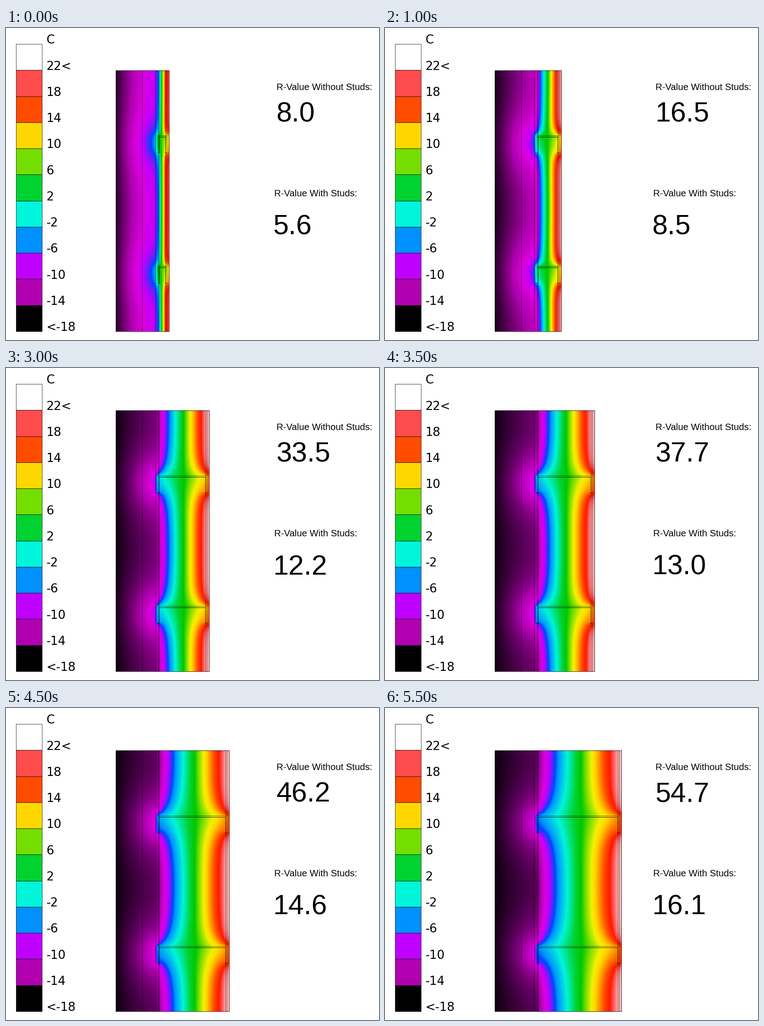
A matplotlib script that plays this animation: 819 by 684 pixels, repeating every 6 s.

```python
import numpy as np
import matplotlib.pyplot as plt
from matplotlib.animation import FuncAnimation
from matplotlib.collections import LineCollection
from matplotlib.patches import Rectangle

WIDTH, HEIGHT, DPI = 819, 684, 72
STEPS, INTERVAL = 12, 500
LEFT, TOP, BOTTOM, PERIOD = 241, 93, 665, 286
SHEATHING, FLANGE, CAVITY = 327, 333, 335
STUD_TOP, STUD_END = 143, 179  # measured from the top of one stud bay
T_OUT, T_IN = -18, 21
FILM_OUT, FILM_IN = 0.17, 0.68
K_CLADDING, K_SHEATHING, K_STRIP = 70, 11, 10
K_FOAM, K_DRYWALL, K_STEEL = 3.42, 21, 2200

STUDDED_R = [5.6, 7.2, 8.5, 9.5, 10.5, 11.4, 12.2, 13.0, 13.8, 14.6, 15.3, 16.1]

# temperature -> colour, from coldest to hottest
SCALE = [
    (-18, (0, 0, 0)), (-14, (176, 0, 176)), (-12, (218, 0, 222)),
    (-10, (192, 0, 255)), (-7.3, (0, 70, 255)), (-6, (0, 144, 255)),
    (-2, (0, 245, 219)), (2, (0, 210, 48)), (4, (0, 200, 0)),
    (6, (116, 222, 0)), (8.5, (242, 242, 0)), (10, (255, 215, 0)),
    (14, (255, 76, 0)), (16.5, (255, 25, 0)), (18, (255, 76, 76)),
    (22, (255, 255, 255)),
]
SCALE_T = [t for t, _ in SCALE]
SCALE_RGB = np.array([c for _, c in SCALE]) / 255

# rows of one bay, finer around the stud
ROWS = np.concatenate([np.arange(0, 119, 7), np.arange(119, 199, 2),
                       np.linspace(199, PERIOD, 13)])
DY = np.diff(ROWS)
Y_MID = (ROWS[:-1] + ROWS[1:]) / 2


def colour(temp):
    return np.stack([np.interp(temp, SCALE_T, SCALE_RGB[:, c]) for c in range(3)], -1)


def right_edge(step):
    return int(round(358.3 + 14.58 * step))


def conductivity(right):
    """Conductivity of each cell, indexed [column, row]."""
    x = np.arange(LEFT, right) + 0.5
    inner, board = right - 8, right - 6
    layers = np.select(
        [x < SHEATHING, x < FLANGE, x < CAVITY, x < inner, x < board],
        [K_CLADDING, K_SHEATHING, K_STRIP, K_FOAM, K_STRIP], K_DRYWALL)
    k = np.repeat(layers[:, None].astype(float), len(DY), axis=1)
    stud = (x > FLANGE) & (x < board)
    flanges = stud & ((x < CAVITY) | (x > inner))
    web = (Y_MID > STUD_TOP) & (Y_MID < STUD_TOP + 2)
    legs = (Y_MID > STUD_TOP) & (Y_MID < STUD_END)
    k[np.ix_(stud, web)] = K_STEEL
    k[np.ix_(flanges, legs)] = K_STEEL
    return k


def solve(right):
    """Steady heat flow through one periodic bay, by block elimination."""
    k = conductivity(right)
    columns, rows = k.shape
    half_x, half_y = 0.5 / k, DY / (2 * k)
    across = DY / (half_x[:-1] + half_x[1:])
    down = 1 / (half_y + np.roll(half_y, -1, axis=1))
    g_out = DY / (FILM_OUT + half_x[0])
    g_in = DY / (FILM_IN + half_x[-1])
    j = np.arange(rows)
    below = (j + 1) % rows
    gains, offsets = [], []
    for i in range(columns):
        before = across[i - 1] if i else g_out
        after = across[i] if i < columns - 1 else g_in
        a = np.diag(before + after + down[i] + np.roll(down[i], 1))
        a[j, below] -= down[i]
        a[below, j] -= down[i]
        if i:
            a -= before[:, None] * gains[-1]
            source = before * offsets[-1]
        else:
            source = before * T_OUT
        both = np.linalg.solve(a, np.column_stack([np.diag(after), source]))
        gains.append(both[:, :-1])
        offsets.append(both[:, -1])
    temp = np.empty((columns, rows))
    following = np.full(rows, float(T_IN))
    for i in reversed(range(columns)):
        following = gains[i] @ following + offsets[i]
        temp[i] = following
    return temp


def wall_image(step):
    temp = solve(right_edge(step))
    y = (np.arange(BOTTOM - TOP) + 0.5) % PERIOD
    pixels = [np.interp(y, Y_MID, column, period=PERIOD) for column in temp]
    return colour(np.array(pixels).T)


def vertical(x, y0, y1):
    return [(x + 0.5, y0), (x + 0.5, y1)]


def horizontal(y, x0, x1):
    return [(x0, y + 0.5), (x1, y + 0.5)]


def layer_lines(right):
    xs = (298, SHEATHING, FLANGE, CAVITY, right - 9, right - 6)
    lines = [vertical(x, TOP, BOTTOM) for x in xs]
    for bay in (TOP, TOP + PERIOD):
        lines.append(horizontal(bay + STUD_TOP - 1, FLANGE, right - 5))
    return lines


def solid_lines(right):
    lines = [vertical(x, TOP, BOTTOM) for x in (LEFT, right - 1)]
    lines += [horizontal(y, LEFT, right) for y in (TOP - 1, BOTTOM - 1)]
    for bay in (TOP, TOP + PERIOD):
        web, end = bay + STUD_TOP + 2, bay + STUD_END
        lines.append(horizontal(web, CAVITY, right - 8))
        for x in (CAVITY, right - 9):
            lines.append(vertical(x, web, end))
        for x in (FLANGE, right - 9):
            lines.append(horizontal(end, x, x + 3))
    return lines


fig = plt.figure(figsize=(WIDTH / DPI, HEIGHT / DPI), dpi=DPI, facecolor="white")
ax = fig.add_axes([0, 0, 1, 1])
ax.axis("off")


def label(x, y, text, size, font="Liberation Sans"):
    return ax.text(x, y, text, size=size, family=font, color="black",
                   ha="left", va="baseline")


# legend
BAND = 57.27
legend_colours = [colour(t) for t in range(22, -19, -4)]
for n, fill in enumerate(legend_colours):
    y0, y1 = round(34 + n * BAND), round(34 + (n + 1) * BAND)
    ax.add_patch(Rectangle((21.5, y0 + 0.5), 57, y1 - y0, fc=fill,
                           ec=(0, 0, 0, 0.75), lw=1))
legend_text = ["C", "22<"] + [str(t) for t in range(18, -15, -4)] + ["<-18"]
for n, text in enumerate(legend_text):
    label(88.6, 34.3 + n * BAND, text, 26.3, "DejaVu Sans")

label(593.6, 136.5, "R-Value Without Studs:", 20.4)
label(588.6, 369, "R-Value With Studs:", 20.4)
plain_value = label(593.8, 205.8, "", 61)
studded_value = label(586.6, 452.8, "", 61)

images = [wall_image(step) for step in range(STEPS)]
wall = ax.imshow(images[0], aspect="auto", interpolation="nearest", zorder=1,
                 extent=(LEFT, right_edge(0), BOTTOM, TOP))
layers = LineCollection([], colors="black", linewidths=1, alpha=0.5,
                        antialiaseds=False, zorder=2)
outline = LineCollection([], colors="black", linewidths=1, alpha=0.8,
                         antialiaseds=False, zorder=3)
for lines in (layers, outline):
    ax.add_collection(lines, autolim=False)
ax.set_xlim(0, WIDTH)
ax.set_ylim(HEIGHT, 0)
ax.set_autoscale_on(False)


def update(step):
    right = right_edge(step)
    wall.set_data(images[step])
    wall.set_extent((LEFT, right, BOTTOM, TOP))
    layers.set_segments(layer_lines(right))
    outline.set_segments(solid_lines(right))
    plain_value.set_text(f"{8 + 4.249 * step:.1f}")
    studded_value.set_text(f"{STUDDED_R[step]:.1f}")
    return wall, layers, outline, plain_value, studded_value


anim = FuncAnimation(fig, update, frames=STEPS, interval=INTERVAL,
                     repeat=True, repeat_delay=0, blit=False)
plt.show()
```
